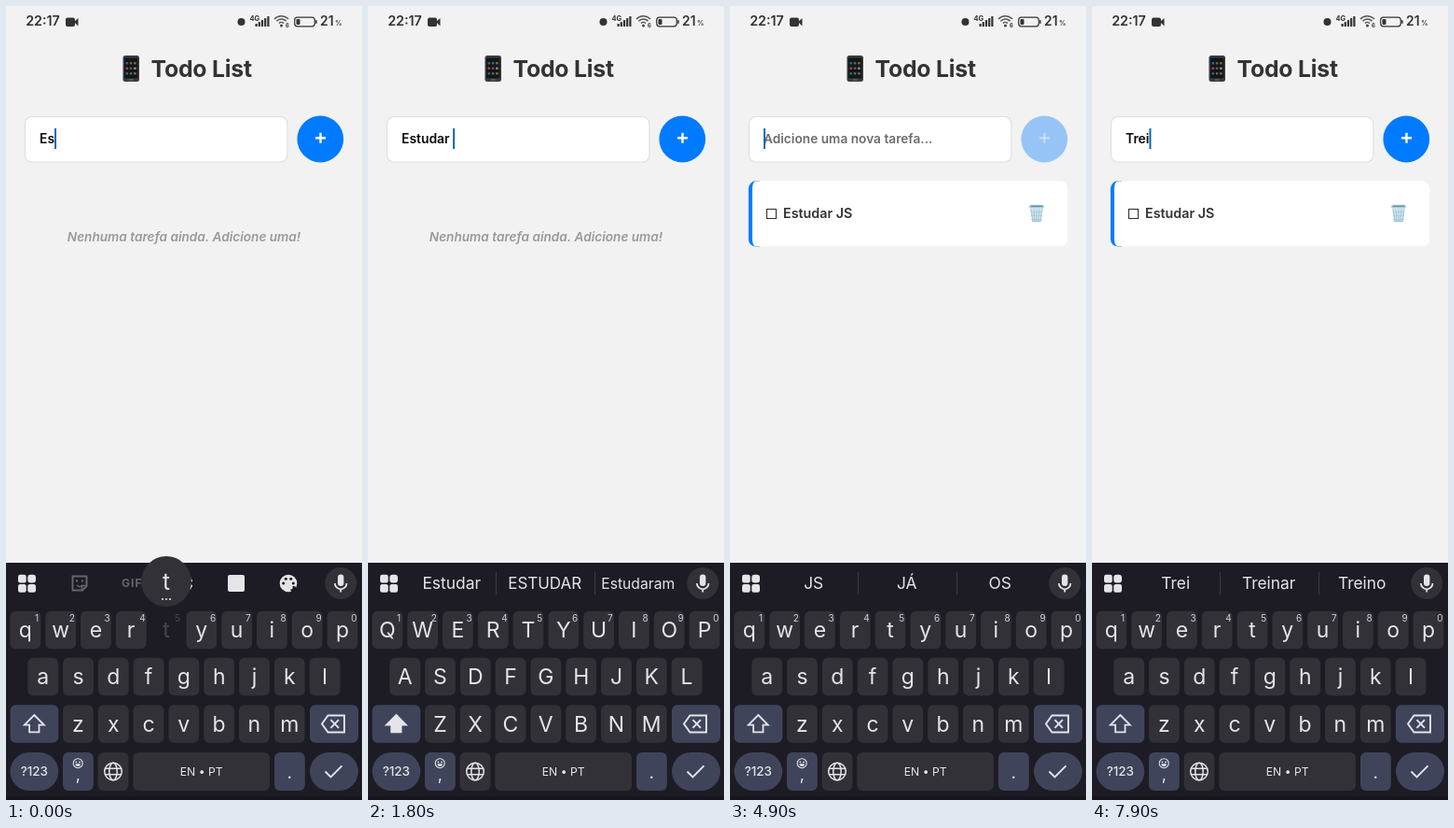
Recreate the animation shown at these times as an HTML page with a canvas. Size 382 by 850 pixels, loop 8 s.

```html
<!DOCTYPE html>
<html lang="pt">
<head>
<meta charset="utf-8">
<title>Todo List</title>
<style>
  html, body { margin: 0; width: 100%; height: 100%; overflow: hidden; background: #f2f2f2; }
  canvas { display: block; width: 382px; height: 850px; }
</style>
</head>
<body>
<canvas id="stage"></canvas>
<script>
const LOOP = 8000, W = 382, H = 850;
const BLUE = '#007aff', INK = '#333', PANEL = '#1d1c24', KEY = '#323138', SPECIAL = '#40445b';
const LIGHT = '#e4e4e9', FADED = '#48474e';

const canvas = document.getElementById('stage');
const c = canvas.getContext('2d');
const ratio = window.devicePixelRatio || 1;
canvas.width = W * ratio;
canvas.height = H * ratio;

// [start, text in the field]
const typing = [
  [0, 'Es'], [100, 'Est'], [200, 'Estu'], [300, 'Estud'], [400, 'Estuda'], [600, 'Estudar'],
  [1600, 'Estudar '], [2000, 'Estudar J'], [3700, 'Estudar JS'], [4800, ''],
  [6600, 'T'], [7000, 'Tr'], [7300, 'Tre'], [7800, 'Trei']
];
// [start, end, key]
const presses = [
  [0, 100, 't'], [100, 200, 'u'], [200, 300, 'd'], [300, 400, 'a'], [500, 600, 'r'],
  [1500, 1600, ' '], [1900, 2000, 'j'], [3500, 3700, 's'],
  [6500, 6600, 't'], [6900, 7000, 'r'], [7200, 7300, 'e'], [7600, 7700, 'i']
];
// [start, suggestions or null for the toolbar]; '*' stands for the typed word
const strips = [
  [0, null], [200, ['*', 'ESTUDAR', 'Estudaram']], [1600, ['Estudar', 'ESTUDAR', 'Estudaram']],
  [2000, ['J', 'Já', 'Junto']], [3700, ['JS', 'JÁ', 'OS']], [5200, null],
  [6600, ['*', 'Treinar', 'Treino']]
];
const rows = [['qwertyuiop', 20.8, 668], ['asdfghjkl', 39.7, 718], ['zxcvbnm', 77.4, 768.5]];
const PITCH = 37.8;
const CLEAR = 4800;

const current = (list, t) => list.filter(e => e[0] <= t).pop();
const upper = t => (t >= 1700 && t < 3800) || (t >= 5200 && t < 6600);

function font(size, weight = 400, style = '') {
  c.font = `${style} ${weight} ${size}px Inter, Roboto, sans-serif`;
}
function text(s, x, y, size, color, weight = 400, align = 'left', style = '') {
  font(size, weight, style);
  c.textAlign = align;
  c.fillStyle = color;
  c.fillText(s, x, y);
}
function spaced(gap, draw) {
  c.letterSpacing = gap + 'px';
  draw();
  c.letterSpacing = '0px';
}
function box(x, y, w, h, r, color) {
  c.beginPath();
  c.roundRect(x, y, w, h, r);
  c.fillStyle = color;
  c.fill();
}
function disc(x, y, r, color) {
  c.beginPath();
  c.arc(x, y, r, 0, 7);
  c.fillStyle = color;
  c.fill();
}
function trace(points, close) {
  c.beginPath();
  points.forEach(([x, y]) => c.lineTo(x, y));
  if (close) c.closePath();
}
function stroke(color, width) {
  c.strokeStyle = color;
  c.lineWidth = width;
  c.stroke();
}
function at(x, y, draw) {
  c.save();
  c.translate(x, y);
  draw();
  c.restore();
}

function statusBar() {
  text('22:17', 21.2, 21.3, 14.3, INK, 600);
  box(64, 12.5, 10, 9.5, 2, INK);
  trace([[73, 17], [77.5, 13], [77.5, 21.5]], true);
  c.fill();
  disc(252.5, 17, 4, INK);
  text('4G', 261.5, 16, 7.5, INK, 700);
  for (let i = 0; i < 5; i++) box(267.5 + i * 3.2, 19 - i * 2, 2.2, 3 + i * 2, 0.6, INK);
  at(295.5, 21, () => {
    [3.5, 7, 10.3].forEach(r => {
      c.beginPath();
      c.arc(0, 0, r, -Math.PI * 0.76, -Math.PI * 0.24);
      stroke('#555', 1.5);
    });
    disc(0, 0, 1.5, '#444');
  });
  text('6', 300, 23, 6, INK, 700);
  c.beginPath();
  c.roundRect(309.7, 12.2, 21.6, 9.6, 3);
  stroke(INK, 1.2);
  box(311.5, 14, 4, 6, 1, INK);
  box(332.2, 15, 1.5, 4, 0.7, INK);
  text('21', 337, 21.3, 13.9, INK, 600);
  text('%', 353, 21.3, 7.5, INK, 600);
}

function phoneIcon() {
  box(125.5, 53, 17.5, 28, 2.5, '#3a3d40');
  box(127, 55.5, 14.5, 22, 0.5, '#14171a');
  const tints = ['#b0443c', '#8a6b2c', '#3a7d4a', '#35658f', '#8d9194', '#74477f'];
  for (let i = 0; i < 9; i++) {
    box(128.5 + i % 3 * 4.3, 60 + Math.floor(i / 3) * 5.5, 2.6, 2.6, 0.8, tints[(i * 5 + 3) % 6]);
  }
  box(131.8, 78.4, 5, 1.2, 0.6, '#70777c');
}

function trashIcon() {
  at(329, 221.5, () => {
    trace([[-7, -5], [7, -5], [5, 9], [-5, 9]], true);
    c.fillStyle = '#d3e8f1';
    c.fill();
    for (let i = -2; i <= 2; i++) {
      trace([[i * 2.9, -4], [i * 2.1, 8]]);
      stroke('#9cc0d0', 0.9);
    }
    for (let y = -1; y < 8; y += 4) {
      trace([[-6, y], [6, y]]);
      stroke('#a9cad8', 0.8);
    }
    box(-8, -8.7, 16, 3.8, 1.9, '#a4cbdc');
    box(-6.3, -7.8, 12.6, 1.3, 0.6, '#6d8d9b');
    box(-5, 8, 10, 1.6, 0.8, '#9cc3d4');
  });
}

// Fades out on touch, back in after release.
function buttonAlpha(t) {
  const ease = p => p < 0.5 ? 2 * p * p : 1 - 2 * (1 - p) * (1 - p);
  const clamp = p => Math.min(1, Math.max(0, p));
  return t < CLEAR ? 1 - 0.8 * ease(clamp((t - 4600) / 150)) : 0.2 + 0.8 * ease(clamp((t - CLEAR) / 300));
}

function field(t) {
  const [since, value] = current(typing, t);
  box(19.9, 118, 282.5, 49.5, 8, '#ddd');
  box(20.9, 119, 280.5, 47.5, 7, '#fff');
  if (value) text(value, 36, 147, 13.9, '#0a0a0a', 600);
  else text('Adicione uma nova tarefa...', 36, 147, 13.7, '#6b6b6b', 600);
  font(13.9, 600);
  const end = value ? c.measureText(value).width : 0;
  if (Math.floor((t - since) / 500) % 2 === 0) {
    c.fillStyle = '#0f68b4';
    c.fillRect(36 + end, 131, 2, 22);
  }
  c.globalAlpha = buttonAlpha(t);
  disc(337.3, 142.5, 24.9, BLUE);
  box(332, 140, 11, 2.4, 0.3, '#fff');
  box(336.3, 135.7, 2.4, 11, 0.3, '#fff');
  c.globalAlpha = 1;
}

function tasks(t) {
  if (t < CLEAR) {
    text('Nenhuma tarefa ainda. Adicione uma!', 191, 252, 13.6, '#999', 600, 'center', 'italic');
    return;
  }
  c.save();
  c.beginPath();
  c.roundRect(19.9, 187.3, 342.4, 70.2, 8);
  c.clip();
  c.fillStyle = BLUE;
  c.fillRect(19, 187, 13, 71);
  c.beginPath();
  c.moveTo(363, 187.3);
  c.lineTo(27.9, 187.3);
  c.ellipse(27.9, 195.3, 4, 8, 0, -Math.PI / 2, Math.PI, true);
  c.lineTo(23.9, 249.5);
  c.ellipse(27.9, 249.5, 4, 8, 0, Math.PI, Math.PI / 2, true);
  c.lineTo(363, 257.5);
  c.fillStyle = '#fff';
  c.fill();
  c.restore();
  c.strokeStyle = INK;
  c.lineWidth = 1.1;
  c.strokeRect(39.5, 217.5, 10, 10);
  text('Estudar JS', 57, 227, 14.3, INK, 600);
  trashIcon();
}

function gridIcon() {
  for (let i = 0; i < 4; i++) {
    box(13 + i % 2 * 10.3, 608.7 + (i >> 1) * 10.3, 8.7, 8.7, i === 1 ? 3.2 : 2.2, LIGHT);
  }
}

function micIcon() {
  disc(359.3, 618, 17, KEY);
  box(356, 608.5, 6.4, 12.5, 3.2, LIGHT);
  c.beginPath();
  c.arc(359.2, 618, 6.3, 0, Math.PI);
  stroke(LIGHT, 1.8);
  trace([[359.2, 624], [359.2, 627.5]]);
  stroke(LIGHT, 1.8);
}

function toolbar() {
  const dim = '#66656b';
  at(79, 618, () => {
    trace([[-7.5, -7.5], [7.5, -7.5], [7.5, 3], [3, 7.5], [-7.5, 7.5]], true);
    stroke(dim, 1.9);
    trace([[7.5, 2.5], [2.5, 2.5], [2.5, 7.5]]);
    stroke(dim, 1.5);
    disc(-3, -2.5, 1.2, dim);
    disc(3, -2.5, 1.2, dim);
    c.beginPath();
    c.arc(0, 0, 3.5, 0.6, 2.6);
    stroke(dim, 1.4);
  });
  spaced(1, () => text('GIF', 135.3, 622.3, 12, dim, 700, 'center'));
  at(191, 618, () => {
    for (let i = 0; i < 6; i++) {
      c.rotate(Math.PI / 3);
      box(-2.7, -9.3, 5.4, 6, 1, LIGHT);
    }
    disc(0, 0, 7, LIGHT);
    disc(0, 0, 3, PANEL);
  });
  box(238, 609, 18, 18, 2, LIGHT);
  at(303, 618, () => {
    disc(0, 0, 9.3, LIGHT);
    [[-5.3, 0], [-2.7, -4.7], [2.7, -4.7], [5.3, 0]].forEach(([x, y]) => disc(x, y, 1.5, PANEL));
    disc(5.4, 6.2, 3.2, PANEL);
    disc(2.5, 4.4, 2.2, LIGHT);
  });
}

function suggestions(words, typed) {
  words.forEach((word, i) => {
    const s = word === '*' ? typed.trim() : word;
    font(17.4);
    const size = Math.min(17.4, 17.4 * 79 / c.measureText(s).width);
    text(s, 89.7 + i * 100, 624.3, size, LIGHT, 400, 'center');
  });
  c.fillStyle = '#3c3b43';
  c.fillRect(137, 606, 1, 24);
  c.fillRect(243, 606, 1, 24);
}

function letters(caps, held) {
  rows.forEach(([keys, x0, y], row) => [...keys].forEach((key, i) => {
    const x = x0 + i * PITCH, down = key === held;
    if (!down) box(x - 16.4, y - 20.3, 32.8, 40.6, 6, KEY);
    text(caps ? key.toUpperCase() : key, x, y + 8, 23, down ? FADED : LIGHT, 400, 'center');
    if (row === 0) text(String((i + 1) % 10), x + 12.3, 659.3, 10, down ? FADED : '#d0d0d6', 400, 'center');
  }));
}

function popup(caps, held) {
  rows.forEach(([keys, x0, y]) => {
    const i = keys.indexOf(held);
    if (i < 0) return;
    const x = x0 + i * PITCH;
    disc(x, y - 52, 27, KEY);
    text(caps ? held.toUpperCase() : held, x, y - 43.5, 24.5, LIGHT, 400, 'center');
    for (let k = -1; k <= 1; k++) disc(x + k * 4, y - 33, 1.1, LIGHT);
  });
}

function functionKeys(caps, held) {
  box(4.5, 748.2, 51.8, 40.6, 6, SPECIAL);
  at(30.3, 768.5, () => {
    trace([[0, -9.5], [10.5, 1.2], [5.2, 1.2], [5.2, 8.8], [-5.2, 8.8], [-5.2, 1.2], [-10.5, 1.2]], true);
    if (caps) {
      c.fillStyle = LIGHT;
      c.fill();
    }
    stroke(LIGHT, 1.8);
  });
  box(326, 748.2, 52, 40.6, 6, SPECIAL);
  at(352, 768.5, () => {
    trace([[-13, 0], [-6.5, -9], [11, -9], [11, 9], [-6.5, 9]], true);
    stroke(LIGHT, 1.9);
    trace([[-3.5, -4.3], [5, 4.3]]);
    stroke(LIGHT, 1.9);
    trace([[5, -4.3], [-3.5, 4.3]]);
    stroke(LIGHT, 1.9);
  });

  box(4.5, 799, 51.8, 41, 20.5, SPECIAL);
  text('?123', 30.3, 824, 13.4, LIGHT, 500, 'center');
  box(61, 799, 32.8, 41, 6, SPECIAL);
  at(77.2, 810.7, () => {
    c.beginPath();
    c.arc(0, 0, 5, 0, 7);
    stroke(LIGHT, 1.1);
    disc(-1.8, -1.3, 0.9, LIGHT);
    disc(1.8, -1.3, 0.9, LIGHT);
    c.beginPath();
    c.arc(0, 0.5, 2.7, 0, Math.PI);
    c.fill();
  });
  text(',', 77.4, 828.5, 18, LIGHT, 400, 'center');
  box(98.6, 799, 32.8, 41, 6, KEY);
  at(115, 819.5, () => {
    [9.3, 4.2].forEach(rx => {
      c.beginPath();
      c.ellipse(0, 0, rx, 9.3, 0, 0, 7);
      stroke(LIGHT, 1.5);
    });
    [-3.2, 3.2].forEach(y => {
      trace([[-8.8, y], [8.8, y]]);
      stroke(LIGHT, 1.5);
    });
  });
  box(136.3, 799, 146.7, 41, 6, held === ' ' ? FADED : KEY);
  text('EN • PT', 209.7, 823.8, 12.2, LIGHT, 400, 'center');
  box(288, 799, 32.8, 41, 6, SPECIAL);
  text('.', 304.3, 826.5, 19, LIGHT, 400, 'center');
  box(326, 799, 52, 41, 20.5, SPECIAL);
  trace([[342.5, 819.5], [348.5, 825.5], [360.5, 813.3]]);
  stroke(LIGHT, 1.9);
}

function keyboard(t) {
  const press = presses.find(([a, b]) => t >= a && t < b);
  const held = press ? press[2] : null;
  const caps = upper(t);
  const words = current(strips, t)[1];
  c.fillStyle = PANEL;
  c.fillRect(0, 596, W, 254);
  c.fillStyle = '#16151c';
  c.fillRect(0, 846, W, 4);
  gridIcon();
  if (words) suggestions(words, current(typing, t)[1]);
  else toolbar();
  micIcon();
  letters(caps, held);
  functionKeys(caps, held);
  popup(caps, held);
}

function draw(t) {
  c.setTransform(ratio, 0, 0, ratio, 0, 0);
  c.fillStyle = '#f2f2f2';
  c.fillRect(0, 0, W, H);
  statusBar();
  phoneIcon();
  spaced(-0.2, () => text('Todo List', 155.5, 75.7, 24.8, INK, 700));
  field(t);
  tasks(t);
  keyboard(t);
}

const start = performance.now();
function tick() {
  draw((performance.now() - start) % LOOP);
  requestAnimationFrame(tick);
}
tick();
</script>
</body>
</html>
```
